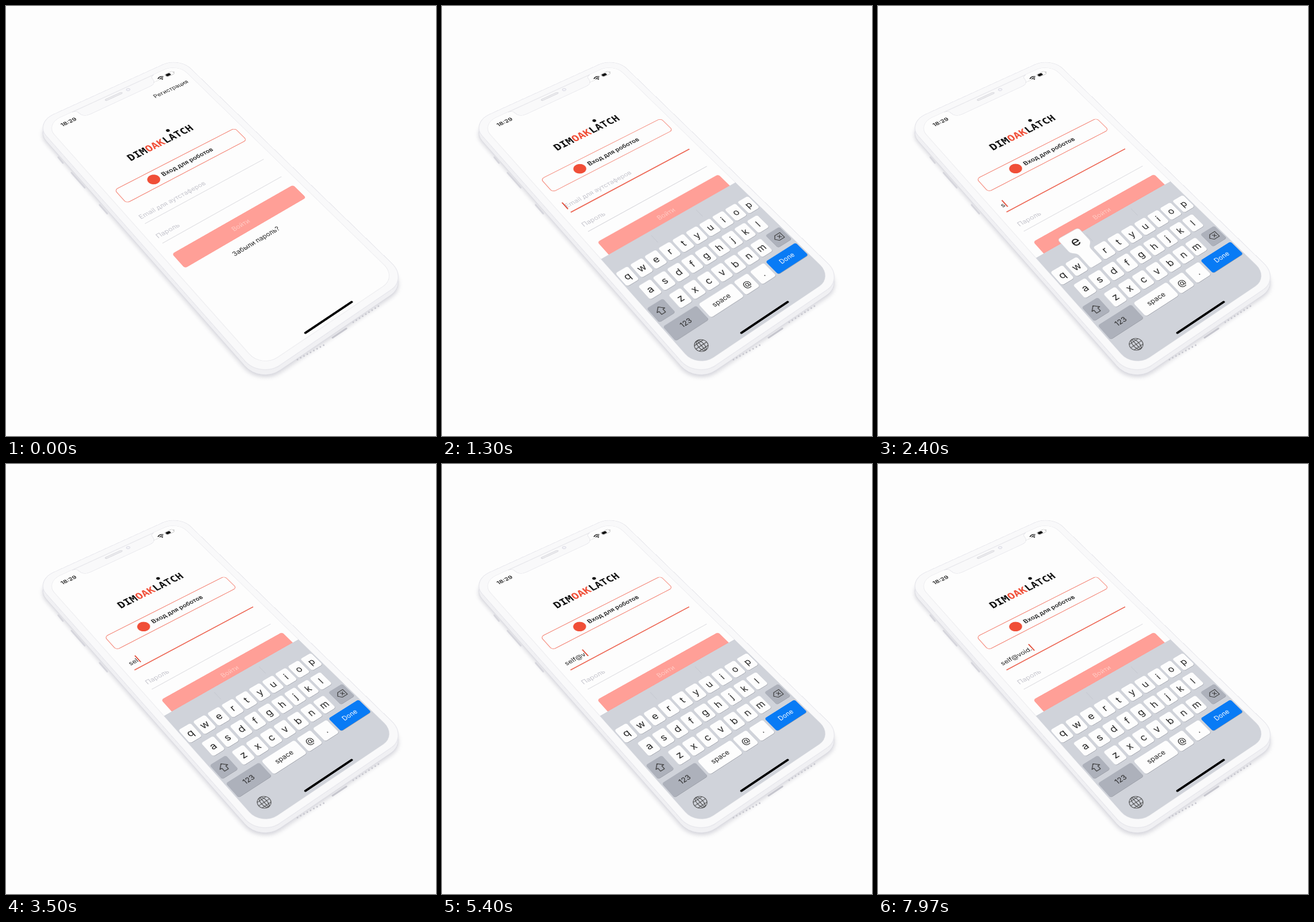
An HTML page for the animation above (8 s loop, 748 by 748 pixels).

```html
<!DOCTYPE html>
<html lang="ru">
<head>
<meta charset="utf-8">
<style>
  html, body { margin: 0; width: 100%; height: 100%; overflow: hidden; background: #fdfdfd; }
  svg { position: absolute; left: 0; top: 0; overflow: visible; }
  .plane {
    transform-origin: 0 0;
    transform: matrix3d(.6763,-.2606,0,.000209, .3838,.4084,0,-.00018053, 0,0,1,0, 68,205.7,0,1);
  }
  .depth { top: 9px; filter: drop-shadow(-3px 4px 5px rgba(90,90,115,.24)); }
  text { font-family: Inter, Roboto, sans-serif; font-size: 16px; fill: #222; }
  .mid { text-anchor: middle; }
  .hint { fill: #c4c4cc; }
</style>
</head>
<body>
<svg class="plane depth" width="375" height="812">
  <rect x="-17" y="-17" width="409" height="846" rx="50" fill="#f0f0f3" stroke="#d6d6de"/>
</svg>

<svg class="plane" width="375" height="812">
  <defs>
    <clipPath id="glass"><rect width="375" height="812" rx="40"/></clipPath>
    <clipPath id="belowStatus"><rect y="44" width="375" height="768"/></clipPath>
  </defs>
  <rect x="-17" y="-17" width="409" height="846" rx="50" fill="#f9f9fa" stroke="#e6e6eb" stroke-width="1.5"/>
  <rect width="375" height="812" rx="40" fill="#fdfdfd" stroke="#e6e6ea"/>

  <g clip-path="url(#glass)">
    <g clip-path="url(#belowStatus)">
      <g id="form">
        <text x="359" y="71" text-anchor="end">Регистрация</text>
        <text x="186" y="208" class="mid" style="font:bold 27px 'DejaVu Sans Mono',monospace;fill:#111">DIM<tspan fill="#f04e37">OAK</tspan>LATCH</text>
        <circle cx="222" cy="176" r="4.5" fill="#111"/>
        <rect x="20" y="259" width="337" height="47" rx="8" fill="none" stroke="#f4705f" stroke-width="1.3"/>
        <circle cx="108" cy="283" r="14.5" fill="#f04e37"/>
        <text x="131" y="288" style="font-weight:600">Вход для роботов</text>
        <text id="emailHint" class="hint" x="20" y="362">Email для аутстаферов</text>
        <text id="email" x="20" y="362"></text>
        <rect id="caret" y="343" width="2.4" height="23" fill="#e0442f"/>
        <path id="emailLine" d="M20 377H352"/>
        <text class="hint" x="20" y="427">Пароль</text>
        <path d="M20 443H352" stroke="#cbcbd2" stroke-width="1.2"/>
        <rect x="20" y="478" width="338" height="47" rx="6" fill="#ff9f97"/>
        <text class="mid" x="188" y="507" style="fill:#ffc9c2">Войти</text>
        <text class="mid" x="188" y="562">Забыли пароль?</text>
      </g>
    </g>
    <g id="keyboard"></g>
  </g>

  <path d="M72 1Q83 2 83 12Q84 30 103 30H272Q291 30 292 12Q292 2 303 1Z" fill="#f9f9fa" stroke="#dedee4"/>
  <rect x="157" y="8" width="47" height="5" rx="2.5" fill="#ededf0" stroke="#c6c6cc"/>
  <circle cx="222" cy="10" r="4.5" fill="#f1f1f6" stroke="#d0d0dc"/>
  <text class="mid" x="48" y="29" style="font-size:15px;font-weight:600">18:29</text>
  <g transform="translate(-2 2)">
    <path d="M290 22h1m3 0h1m3 0h1m3 0h1" stroke="#bbb" stroke-width="2"/>
    <path d="M305 17q8-7 16 0M308 20.5q5-4 10 0" fill="none" stroke="#222" stroke-width="2.4"/>
    <circle cx="313" cy="23.5" r="2" fill="#222"/>
    <rect x="327" y="13" width="23" height="11" rx="3" fill="none" stroke="#aaa"/>
    <rect x="328.5" y="14.5" width="12" height="8" rx="2" fill="#111"/>
    <path d="M352 17v3" stroke="#aaa" stroke-width="1.5"/>
  </g>
  <rect x="120.5" y="799" width="134" height="5" rx="2.5" fill="#000"/>
</svg>

<svg width="748" height="748" fill="none" stroke-linecap="round">
  <g stroke="#c6c6ce" stroke-width="3">
    <path d="M507 615L556 588M604 550L651 520" stroke-dasharray="0 6.5"/>
    <path d="M568 577L592 561"/>
  </g>
  <path d="M91 263L99 273M114 290L137 316M163 346L176 361" stroke="#d6d6dd" stroke-width="3"/>
</svg>

<script>
const $ = id => document.getElementById(id);
const PERIOD = 8000, MESSAGE = 'self@void.';
const FOCUS_AT = 910, KEYBOARD_AT = 944, SCROLL_AT = 986;
const FIRST_KEY = 1830, KEY_STEP = 620, POPUP_TIME = 100;
const ROW_Y = [546, 601, 656, 711];
const keyCenter = {};

const label = (x, y, text, size, fill = '#222') =>
  `<text class="mid" x="${x}" y="${y + size * .34}" style="font-size:${size}px;fill:${fill}">${text}</text>`;

function key(x, y, width, text = '', size = 23, fill = '#fdfdfd', ink) {
  keyCenter[text] = [x, y];
  const box = (top, color) =>
    `<rect x="${x - width / 2}" y="${top}" width="${width}" height="42" rx="5" fill="${color}"/>`;
  return box(y - 20, '#9a9da6') + box(y - 21, fill) + label(x, y, text, size, ink);
}

function buildKeyboard() {
  const gray = '#adb1bb';
  let art = '<rect y="477" width="375" height="340" fill="#d0d3da"/>' +
    '<path d="M125 488v24M250 488v24" stroke="#c2c5cd"/>';
  ['qwertyuiop', 'asdfghjkl', 'zxcvbnm'].forEach((letters, row) => {
    const start = [18.75, 37.5, 75][row];
    [...letters].forEach((letter, i) => art += key(start + i * 37.5, ROW_Y[row], 31.5, letter));
  });
  art += key(24, 656, 42, '', 0, gray) + key(351, 656, 42, '', 0, gray) +
    key(46.5, 711, 87, '123', 16, gray) + key(141, 711, 90, 'space', 16) +
    key(211, 711, 39, '@', 20) + key(257.5, 711, 40, '.', 20) +
    key(327.5, 711, 89, 'Done', 16, '#087bf5', '#fff');
  art += `<g fill="none" stroke="#333" stroke-width="1.5" stroke-linejoin="round">
    <path d="M24 646l10 10h-5v9h-10v-9h-5z"/>
    <path d="M340 656l7-8h15v16h-15zM350 652l8 8m0-8l-8 8"/>
    <g stroke-width="1.2"><circle cx="38" cy="772" r="14"/><ellipse cx="38" cy="772" rx="6.5" ry="14"/>
    <path d="M38 758v28M24 772h28M27 764h22M27 780h22"/></g></g>
    <g id="popup"></g>`;
  $('keyboard').innerHTML = art;
}

function popupArt(letter) {
  const [x, y] = keyCenter[letter];
  return `<path transform="translate(${x} ${y})" fill="#fdfdfd" stroke="#c9ccd3" stroke-width=".8"
    d="M-20-83H20Q28-83 28-75V-43C28-32 16-32 16-20V16Q16 21 11 21H-11Q-16 21-16 16V-20C-16-32-28-32-28-43V-75Q-28-83-20-83Z"/>` +
    label(x, y - 56, letter, 34);
}

// Critically damped spring, 0 to 1.
function spring(ms) {
  const s = Math.max(0, ms) * .01826;
  return 1 - (1 + s) * Math.exp(-s);
}

function draw(t) {
  const move = (id, y) => $(id).setAttribute('transform', `translate(0 ${y})`);
  move('keyboard', 335 * (1 - spring(t - KEYBOARD_AT)));
  move('form', -40 * spring(t - SCROLL_AT));

  const count = Math.min(MESSAGE.length, Math.max(0, Math.floor((t - FIRST_KEY) / KEY_STEP) + 1));
  const nextKeyAt = FIRST_KEY + count * KEY_STEP;
  const focused = t >= FOCUS_AT;
  $('email').textContent = MESSAGE.slice(0, count);
  $('emailHint').style.display = count ? 'none' : '';
  $('emailLine').setAttribute('stroke', focused ? '#ec5f4c' : '#cbcbd2');
  $('emailLine').setAttribute('stroke-width', focused ? 2.6 : 1.2);

  const idle = t - (count ? nextKeyAt - KEY_STEP : FOCUS_AT);
  $('caret').style.display = focused && idle % 1000 < 600 ? '' : 'none';
  $('caret').setAttribute('x', 19 + (count ? $('email').getComputedTextLength() + 2 : 0));

  const pressed = count < MESSAGE.length && t >= nextKeyAt - POPUP_TIME;
  $('popup').innerHTML = pressed ? popupArt(MESSAGE[count]) : '';
}

function tick() {
  draw(performance.now() % PERIOD);
  requestAnimationFrame(tick);
}

buildKeyboard();
tick();
</script>
</body>
</html>
```
